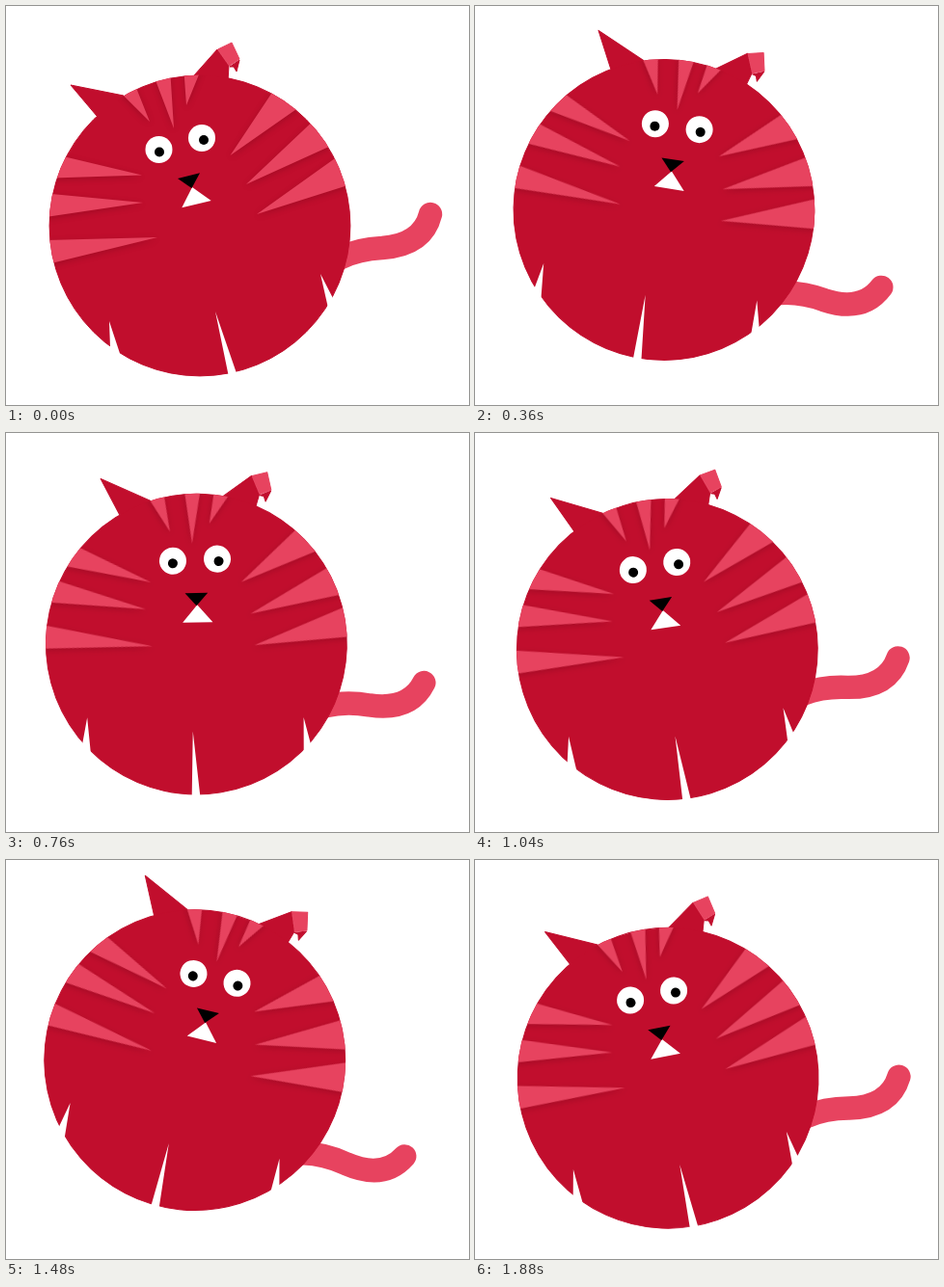
Write an HTML page that moves like this. It is 480x414 px and loops after 1920 ms.

```html
<!DOCTYPE html>
<html lang="en">
<head>
<meta charset="utf-8">
<title>Rocking cat</title>
<style>
  html, body { margin: 0; width: 100%; height: 100%; overflow: hidden; background: #fff; }
  svg { display: block; width: 480px; height: 414px; }
  .red { fill: #c10e2d; stroke: #c10e2d; }
  .pink { fill: #e7435f; }
  .white { fill: #fff; }
  .shade { filter: drop-shadow(0 2px 3px rgba(60, 0, 10, .22)); }
</style>
</head>
<body>
<svg viewBox="0 0 480 414">
  <clipPath id="round"><circle cx="201" cy="228" r="156.4"/></clipPath>
  <g id="cat" stroke-linejoin="round">
    <path d="M345 262Q365 252 390 251Q432 248 440 216" fill="none" stroke="#e7435f" stroke-width="24.4" stroke-linecap="round"/>
    <!-- ears -->
    <path class="red" d="M67 82L122 93L150 130L94 114ZM195 72L219 45L231 62L230 78L200 90ZM232 63L242 56L239 68L236 63Z"/>
    <path class="pink" stroke="#e7435f" d="M219.5 45L234 38L242 55L231.5 62Z"/>
    <circle class="red" cx="201" cy="228" r="155.9"/>
    <g clip-path="url(#round)"><path id="stripes" class="pink shade"/></g>
    <!-- gaps between the legs -->
    <path class="white" d="M107 327L108.3 362L120.5 368ZM217 317L231.6 388L241 387ZM326 278L335 318L343 311Z"/>
    <!-- face -->
    <g class="white">
      <circle cx="158.5" cy="149" r="14"/>
      <circle cx="203" cy="137" r="14"/>
    </g>
    <circle cx="159" cy="151.5" r="5"/>
    <circle cx="205" cy="139" r="5"/>
    <path class="white" d="M193 188L182.3 209.3L212.7 202Z"/>
    <path d="M178 179L201 173.3L192.5 189Z"/>
  </g>
</svg>
<script>
const rad = degrees => degrees * Math.PI / 180;

// a point just outside the body's edge, clockwise from the right
const rim = degrees =>
  `L${201 + 160 * Math.cos(rad(degrees))} ${228 + 160 * Math.sin(rad(degrees))}`;

// three wedges running from their tips to the rim, packed closer clockwise
const fan = (middle, gap, half, tips) => tips.map((tip, i) => {
  const k = i - 1;
  const angle = middle + gap * k - 1.3 * k * k;
  return `M${tip}${rim(angle - half)}${rim(angle + half)}Z`;
}).join('');

document.getElementById('stripes').setAttribute('d',
  fan(187.6, 16.1, 4.4, ['157 240', '142 204', '141 175.5']) +
  fan(-104, 12.4, 3, ['149 120', '174 127', '187 103']) +
  fan(-37.1, 17.4, 5.7, ['232.5 155', '249 185', '260 216']));

const cat = document.getElementById('cat');
const HALF = 480, STEP = 40, SWING = 30;
const start = performance.now();

function draw() {
  const elapsed = Math.max(0, performance.now() - start);
  const t = Math.floor(elapsed / STEP) * STEP % (2 * HALF);
  const angle = SWING * (1 - Math.abs(t - HALF) / HALF);
  cat.setAttribute('transform', `rotate(${angle} 240 207)`);
  requestAnimationFrame(draw);
}
draw();
</script>
</body>
</html>
```
